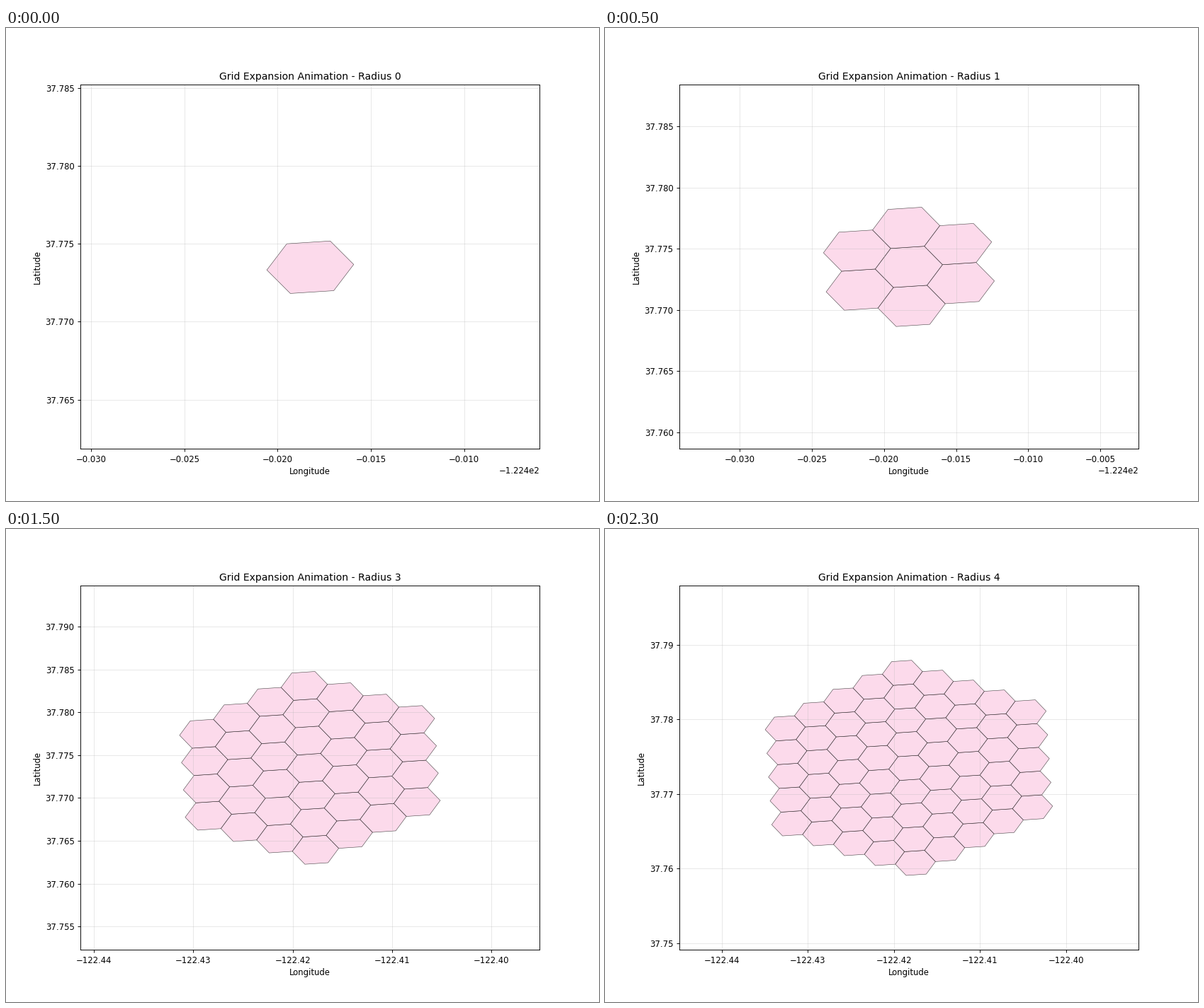
Animation, 837 px wide and 669 px high, one loop 2.5 s. Source, as a matplotlib script:

```python
import numpy as np
import matplotlib.pyplot as plt
from matplotlib.animation import FuncAnimation
from matplotlib.collections import PolyCollection

W, H, DPI = 837, 669, 83.7
RADII = 5
PAD = 0.01  # degrees around the grid

CENTER = np.array([-122.4182710, 37.7735148])
# Three corner offsets (lon, lat); the other three are their mirror images.
HALF = np.array([[0.0012596, -0.0015046],
                 [0.0023310, 0.0001781],
                 [0.0010713, 0.0016827]])
CORNERS = np.vstack([HALF, -HALF])
STEP_Q = CORNERS[0] + CORNERS[1]
STEP_R = CORNERS[2] + CORNERS[3]

FILL = "#fbcbe3"
ALPHA = 0.7


def hex_disk(radius):
    """Corner arrays of all cells within `radius` steps of the centre."""
    span = range(-radius, radius + 1)
    return np.array([CENTER + q * STEP_Q + r * STEP_R + CORNERS
                     for q in span for r in span if abs(q - r) <= radius])


# The tiny excess keeps the pixel size from being truncated down.
fig, ax = plt.subplots(figsize=((W + 1e-6) / DPI, (H + 1e-6) / DPI), dpi=DPI)


def draw(radius):
    ax.clear()
    cells = hex_disk(radius)
    ax.add_collection(PolyCollection(cells, facecolor=FILL, edgecolor="black",
                                     linewidth=0.5, alpha=ALPHA))
    low, high = cells.min(axis=(0, 1)) - PAD, cells.max(axis=(0, 1)) + PAD
    ax.set_xlim(low[0], high[0])
    ax.set_ylim(low[1], high[1])
    ax.set_title(f"Grid Expansion Animation - Radius {radius}")
    ax.set_xlabel("Longitude")
    ax.set_ylabel("Latitude")
    ax.grid(True, alpha=0.3)
    return []


anim = FuncAnimation(fig, draw, frames=RADII, init_func=lambda: [],
                     interval=500, repeat=True, repeat_delay=0)
plt.show()
```
